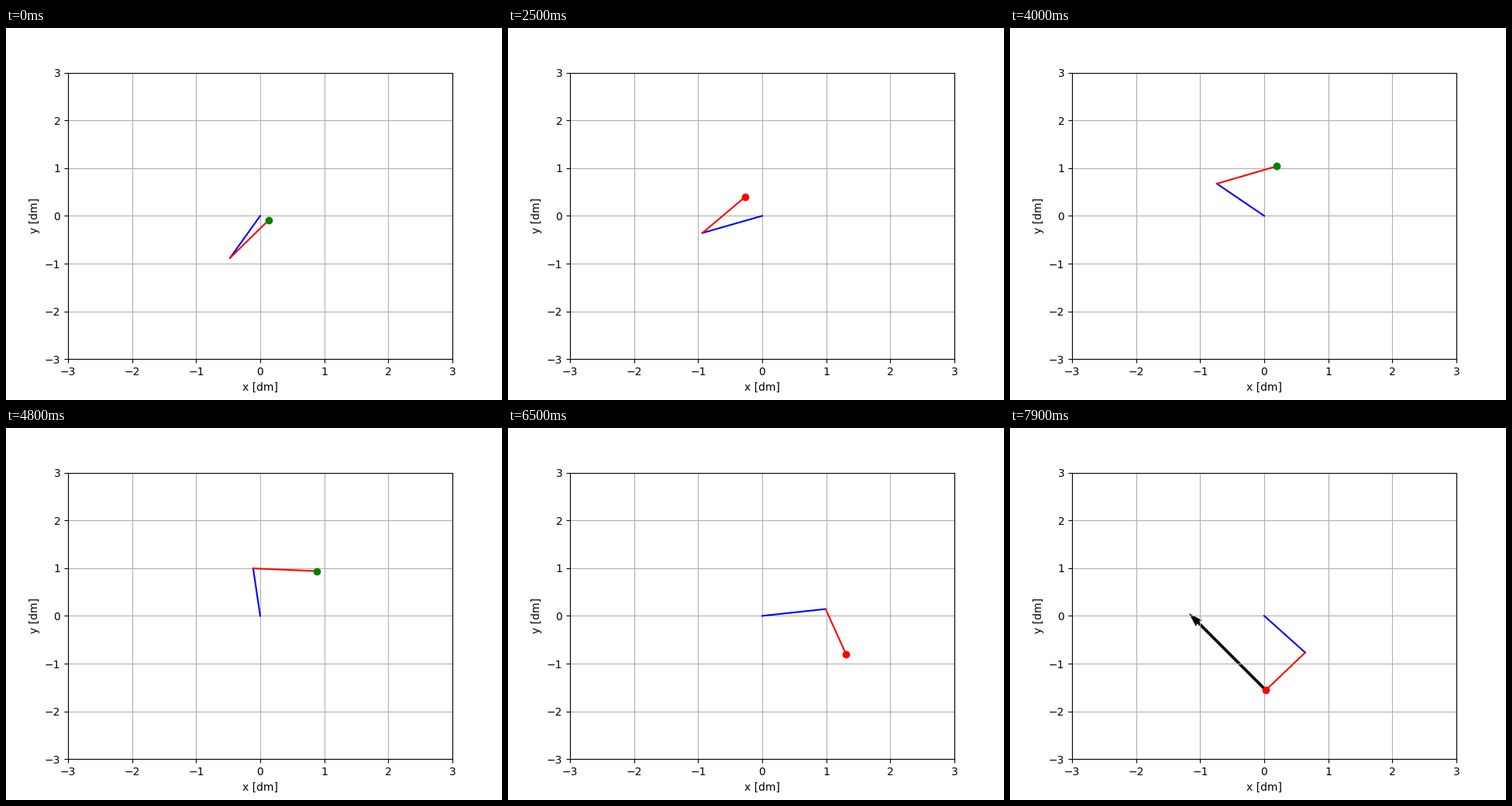
A matplotlib script that plays this animation: 640 by 480 pixels, repeating every 8000 ms.

```python
import numpy as np
import matplotlib.pyplot as plt
from matplotlib.animation import FuncAnimation

FRAMES, INTERVAL = 80, 100

# Joint angles in degrees (shoulder, elbow): resting pose and key poses by second
REST = np.array([241.9, -189.2])
POSES = {
    1.6: (225.6, -172.0),
    3.3: (170.2, -133.0),
    5.8: (43.2, -84.9),
    7.3: (-27.2, -77.8),
    7.9: (-50.2, -77.8),
}

# Leaving rest with zero speed: angle = rest + t^2 * polynomial(t)
key_times = np.array(list(POSES))
turned = np.array(list(POSES.values())) - REST
swing = np.polyfit(key_times, turned / key_times[:, None]**2, len(POSES) - 1)


def joint_angles(t):
    powers = t ** np.arange(len(POSES) - 1, -1, -1)
    return REST + t**2 * (powers @ swing)


def direction(degrees):
    angle = np.radians(degrees)
    return np.array([np.cos(angle), np.sin(angle)])


def arm_time(n):
    """The arm starts with two held poses, then moves every frame."""
    return 0.0 if n < 3 else max(n, 4) / 10


def tip_color(n):
    return "green" if n < 3 or 27 <= n < 53 else "red"


fig, ax = plt.subplots(figsize=(6.4, 4.8), dpi=100)
ax.grid()
upper, = ax.plot([], [], color="blue")
lower, = ax.plot([], [], color="red")
tip, = ax.plot([], [], "o")
force = ax.quiver([0], [0], [-1], [1], scale=5, color="black")
ax.set(xlim=(-3, 3), ylim=(-3, 3), xlabel="x [dm]", ylabel="y [dm]")


def draw(n):
    shoulder, elbow = joint_angles(arm_time(n))
    joint = direction(shoulder)
    hand = joint + direction(shoulder + elbow)
    upper.set_data(*zip((0, 0), joint))
    lower.set_data(*zip(joint, hand))
    tip.set_data(*zip(hand))
    tip.set_color(tip_color(n))
    force.set_offsets([hand])
    force.set_visible(n >= 74)
    return upper, lower, tip, force


anim = FuncAnimation(fig, draw, frames=FRAMES, interval=INTERVAL, repeat=True, repeat_delay=0)
plt.show()
```
